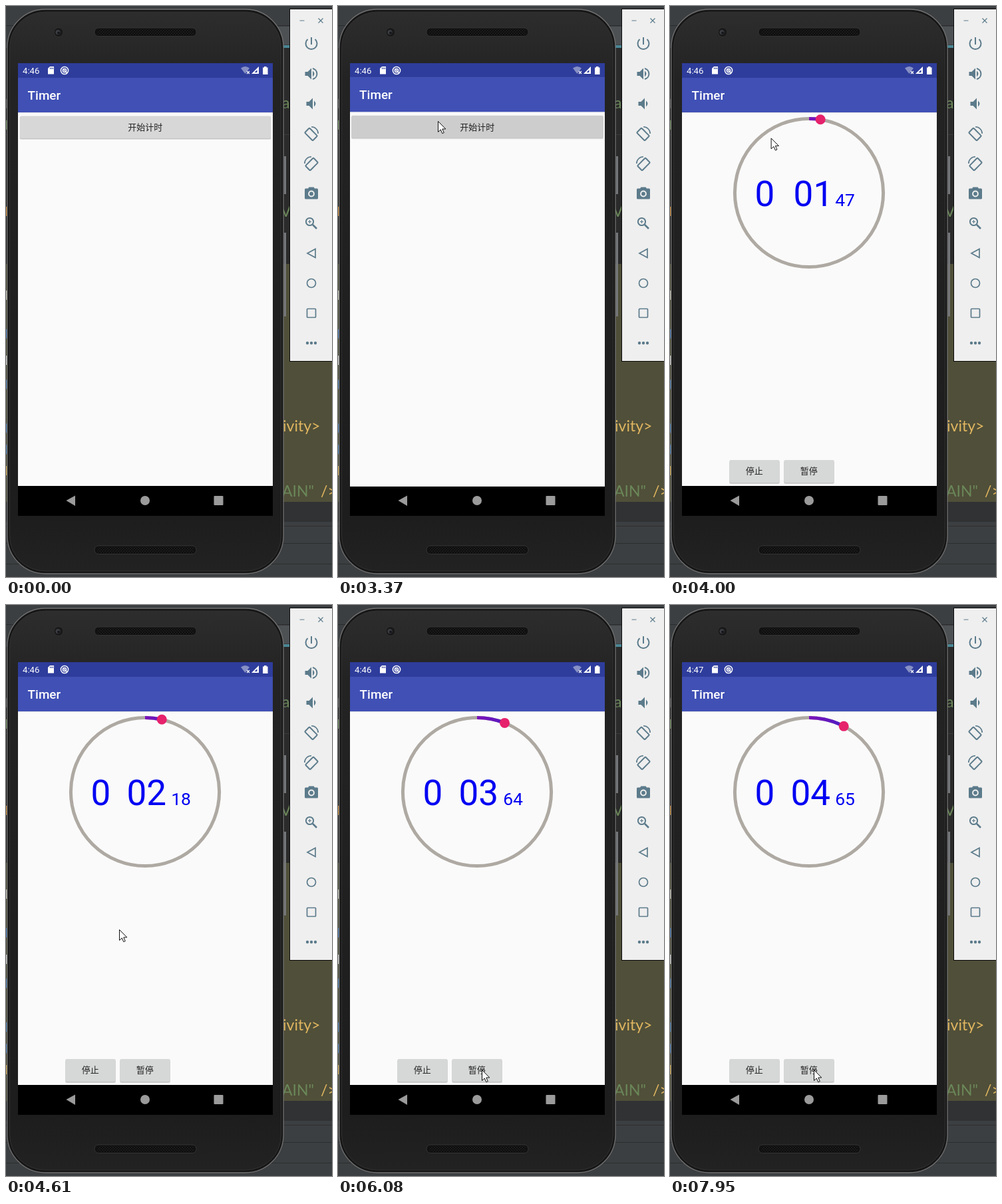
These frames come from a looping animation (490x859 px, 8000 ms). An HTML page:

```html
<!DOCTYPE html>
<html lang="zh">
<head>
<meta charset="utf-8">
<title>Timer</title>
<style>
  html, body { margin: 0; width: 100%; height: 100%; overflow: hidden; background: #2b2b2b; }
  svg { display: block; width: 100vw; height: 100vh; }
  text { font-family: Roboto, sans-serif; white-space: pre; }
  .cjk { font: 13px "Noto Sans CJK SC", "Noto Sans CJK", sans-serif; fill: #222; text-anchor: middle; }
  .code text { font: 23px Lato, sans-serif; }
  .digits { font-size: 53px; fill: #0000f2; }
  .title { font-size: 18.9px; font-weight: 500; fill: #fff; }
  .line { fill: none; stroke: #5c7b8b; stroke-width: 2; }
  .thin { stroke-width: 1.2; }
  .solid { fill: #5c7b8b; }
</style>
</head>
<body>
<svg viewBox="0 0 490 859" preserveAspectRatio="none">
  <defs>
    <linearGradient id="body" x1="0" y1="0" x2="0" y2="1">
      <stop offset="0" stop-color="#2d2d2d"/><stop offset=".12" stop-color="#232323"/>
      <stop offset=".9" stop-color="#1d1d1d"/><stop offset="1" stop-color="#222"/>
    </linearGradient>
    <linearGradient id="sweep" gradientUnits="userSpaceOnUse" x1="209" y1="0" x2="262" y2="0">
      <stop offset="0" stop-color="#7c12b8"/><stop offset="1" stop-color="#4c1cc4"/>
    </linearGradient>
    <pattern id="mesh" width="4" height="4" patternUnits="userSpaceOnUse">
      <rect width="4" height="4" fill="#0c0c0c"/>
      <circle cx="1" cy="1" r=".8" fill="#303030"/><circle cx="3" cy="3" r=".8" fill="#303030"/>
    </pattern>
    <clipPath id="screen"><rect x="18" y="86" width="383" height="681"/></clipPath>
    <g id="speaker">
      <rect x="133" y="33" width="153" height="12.5" rx="6" fill="#111" stroke="#343434"/>
      <rect x="137" y="35" width="145" height="8.5" rx="4" fill="url(#mesh)"/>
    </g>
    <g id="frame">
      <rect x="18" y="86" width="383" height="681"/>
      <rect x="18" y="86" width="383" height="636" fill="#fafafa"/>
      <rect x="18" y="160" width="383" height="1" fill="#dedee4"/>
      <rect x="18" y="108" width="383" height="52" fill="#4050b5"/>
      <rect x="18" y="86" width="383" height="22" fill="#2e3d9c"/>
      <text class="title" x="32.6" y="141">Timer</text>
    </g>
    <g id="key">
      <rect x="-.5" y=".5" width="76" height="35.5" rx="2.5" fill="#e2e2e2"/>
      <rect x="0" y="1" width="75" height="34.6" rx="2" fill="#c4c4c4"/>
      <rect width="75" height="34" rx="2" fill="#d6d7d7"/>
    </g>
  </defs>

  <!-- editor behind the phone -->
  <rect width="490" height="859" fill="#2b2b2b"/>
  <rect width="490" height="63" fill="#3c3f41"/>
  <rect y="29" width="490" height="1" fill="#2a2c2d"/>
  <rect x="405" y="31" width="22" height="27" fill="#4d5154"/>
  <rect x="405" y="59" width="22" height="4" fill="#4a8896"/>
  <rect y="193" width="427" height="1" fill="#3a3a3a"/>
  <rect y="388" width="490" height="358" fill="#504f39"/>
  <rect y="746" width="490" height="30" fill="#303234"/>
  <rect y="776" width="490" height="83" fill="#3c3f41"/>
  <path d="M0 782.5H490M0 808.5H490M0 839.5H490" stroke="#2c2e2f"/>
  <g class="code" fill="#6a8759">
    <text x="415" y="154">a</text>
    <text x="413" y="317">V</text>
    <text x="415" y="738">AIN"</text>
    <g fill="#e0b660">
      <text x="416" y="640">ivity&gt;</text>
      <text x="473" y="738">/&gt;</text>
    </g>
  </g>
  <g id="margin"></g>

  <!-- phone -->
  <path d="M419.5 226V283M419.5 341V467" stroke="#75777a" stroke-width="3"/>
  <rect x="2" y="5" width="415" height="849" rx="57" fill="#161616" stroke="#707070" stroke-width="1.3"/>
  <rect x="5.5" y="9" width="408" height="841" rx="53" fill="url(#body)" stroke="#323232"/>
  <use href="#speaker"/>
  <use href="#speaker" y="779"/>
  <circle cx="79" cy="39.5" r="7" fill="#191919" stroke="#323232"/>
  <circle cx="78" cy="39.5" r="3.5" fill="#3b3d42"/>
  <circle cx="79" cy="40.5" r="2" fill="#15161a"/>

  <g clip-path="url(#screen)">
    <rect x="18" y="86" width="383" height="681"/>
    <g id="home">
      <use href="#frame"/>
      <rect x="20.5" y="166" width="378" height="35" rx="2.5" fill="#dedede"/>
      <rect x="21" y="166" width="377" height="34" rx="2" fill="#c4c4c4"/>
      <rect id="start" x="21" y="165.5" width="377" height="33.5" rx="2"/>
      <text class="cjk" x="209.3" y="187.3">开始计时</text>
    </g>
    <g id="timer">
      <use href="#frame"/>
      <circle cx="209" cy="281" r="111.6" fill="none" stroke="#aea9a2" stroke-width="5"/>
      <path id="arc" fill="none" stroke="url(#sweep)" stroke-width="5"/>
      <circle id="ball" r="7.5" fill="#e6226c"/>
      <g class="digits">
        <text x="127.5" y="301">0</text>
        <text id="sec" y="301"></text>
        <text id="hund" y="301" font-size="26.5"></text>
      </g>
      <use href="#key" x="89.5" y="683"/>
      <use href="#key" x="171.5" y="683"/>
      <rect id="press" x="171.5" y="683" width="75" height="34" rx="2"/>
      <text class="cjk" x="126.7" y="704.3">停止</text>
      <text class="cjk" id="label" x="208.7" y="704.3"></text>
    </g>

    <!-- system bars -->
    <text id="clock" x="25" y="102" font-size="13.2" fill="#fff"></text>
    <path d="M66 91H72V102.5H63V94Z" fill="#fff"/>
    <path d="M66.5 92.5V95M68.5 92.5V95M70.5 92.5V95" stroke="#2e3d9c"/>
    <g fill="none" stroke="#fff" stroke-width="1.5">
      <circle cx="88" cy="97" r="5.6"/>
      <circle cx="88" cy="97" r="2.6"/>
      <path d="M85.5 94.5L92 101"/>
    </g>
    <path d="M353 93.5Q359.5 88.5 366 93.5L359.5 102Z" fill="#8790c5"/>
    <path d="M362 98L366 102M366 98L362 102" stroke="#fff" stroke-width="1.3"/>
    <path d="M380 91V102H369Z" fill="#fff"/>
    <path d="M377.5 96V100H373.5Z" fill="#2e3d9c"/>
    <path d="M386 92.5H388V91H391.5V92.5H393.5V103H386Z" fill="#fff"/>
    <g fill="#9b9b9b">
      <path d="M90.5 744L104 736.5V752Z"/>
      <circle cx="209" cy="744" r="7"/>
      <rect x="312.5" y="737" width="14" height="14" rx="1"/>
    </g>
  </g>

  <!-- emulator toolbar -->
  <rect x="426.5" y="4.5" width="70" height="530" fill="#efefef" stroke="#080808"/>
  <path class="line thin" d="M441.5 22H448.5M469.5 18.5L476.5 25.5M476.5 18.5L469.5 25.5"/>
  <path class="line" transform="translate(459 57)" d="M0 -10V1M-5.5 -7A8.5 8.5 0 1 0 5.5 -7"/>
  <g transform="translate(459 102)">
    <path class="solid" d="M-9.5 -3H-5.5L0 -8.5V8.5L-5.5 3H-9.5ZM2 -4.5Q7 0 2 4.5Z"/>
    <path class="line" d="M2 -8A8.2 8.2 0 0 1 2 8"/>
  </g>
  <path class="solid" transform="translate(459 147)" d="M-7.5 -3H-3.5L2 -8.5V8.5L-3.5 3H-7.5ZM4 -4.5Q9 0 4 4.5Z"/>
  <g id="turn" transform="translate(459 192)">
    <rect class="line" x="-5" y="-8.5" width="10" height="17" rx="1.2" transform="translate(-.5 1) rotate(-45)"/>
    <path class="line" d="M0 -10.2A10.2 10.2 0 0 1 10.2 0" style="stroke-width:1.6"/>
  </g>
  <use href="#turn" transform="translate(918 45) scale(-1 1)"/>
  <g transform="translate(459 282)">
    <path class="solid" d="M-3.5 -9.5H3.5L5 -7.5H8.5Q10 -7.5 10 -6V7Q10 8.5 8.5 8.5H-8.5Q-10 8.5 -10 7V-6Q-10 -7.5 -8.5 -7.5H-5Z"/>
    <circle r="3.9" cy=".5" fill="#5c7b8b" stroke="#efefef" stroke-width="2"/>
  </g>
  <g transform="translate(459 327)">
    <circle class="line" cx="-2.5" cy="-2.5" r="5.6"/>
    <path class="line" d="M2 2L8 8" style="stroke-width:2.6"/>
    <path class="line thin" d="M-5 -2.5H0M-2.5 -5V0"/>
  </g>
  <g class="line" style="stroke-width:1.7">
    <path d="M453 372L465 365.5V378.5Z"/>
    <circle cx="459" cy="417" r="6.5"/>
    <rect x="452.5" y="455.5" width="13" height="13" rx="1"/>
  </g>
  <g class="solid">
    <circle cx="453" cy="507" r="2.2"/><circle cx="459" cy="507" r="2.2"/><circle cx="465" cy="507" r="2.2"/>
  </g>

  <g id="cursor">
    <circle id="click" r="14" fill="none" stroke="#444" stroke-width="1.5"/>
    <path d="M.5 .5V16.5L4.3 13L6.8 18.7L9.3 17.6L6.8 12H11.8Z" fill="#fff" stroke="#111"/>
  </g>
</svg>

<script>
const LOOP = 8000, TICK = 77.4, OFFSET = 185;
const $ = id => document.getElementById(id);
const set = (id, attrs) => { for (const a in attrs) $(id).setAttribute(a, attrs[a]); };
const show = (id, on) => set(id, { visibility: on ? 'visible' : 'hidden' });
const pad = n => String(n).padStart(2, '0');

// Linear interpolation through [tick, value, ...] keys.
function track(keys, k, col = 1) {
  if (k <= keys[0][0]) return keys[0][col];
  for (let i = 1; i < keys.length; i++) {
    const a = keys[i - 1], b = keys[i];
    if (k <= b[0]) return a[col] + (b[col] - a[col]) * (k - a[0]) / (b[0] - a[0]);
  }
  return keys[keys.length - 1][col];
}

const elapsed = [[43, .95], [44, 1.03], [57, 2.18], [58, 2.18], [59, 2.33], [68, 3.01],
  [83, 4.2], [86, 4.42], [97, 4.42], [100, 4.65]];
const pointer = [[0, 367, 807], [2, 300, 560], [4, 205, 300], [6, 155, 185], [7, 150, 173],
  [48, 150, 173], [53, 158, 300], [57, 170, 488], [58, 170, 488], [68, 203, 587],
  [69, 214, 620], [73, 217, 680], [76, 216, 699]];
const homeScale = [[40, 1], [41, 1.003], [43, 1.045], [44, 1.05]];
const timerScale = [[43, .985], [44, .9935], [45, .998], [46, 1]];
const startTone = [[13, 214.5], [21, 205]];
const pressed = [[84, 0], [86, .06], [88, .06], [90, 0], [94, 0], [95, .06], [98, .06], [100, 0]];

// Code fragments peeking out left of the phone.
const scraps = [[140, '#555'], [172, '#6a8759'], [302, '#c98d3c'], [428, '#c5c5bd'], [486, '#4977b5'], [526, '#d5d5d5'],
  [562, '#4b7bb0'], [628, '#4b7bb0'], [660, '#4b7bb0'], [692, '#d5ad55']];
$('margin').innerHTML = scraps.map(([y, c]) => `<rect y="${y}" width="1.5" height="14" fill="${c}"/>`).join('');

const zoom = s => `translate(209.5 426.5) scale(${s}) translate(-209.5 -426.5)`;

function drawTimer(k) {
  const cs = Math.round(track(elapsed, k) * 100);
  const sec = Math.floor(cs / 100), angle = cs / 100 * Math.PI / 30;
  const x = 209 + 111.6 * Math.sin(angle), y = 281 - 111.6 * Math.cos(angle);
  set('arc', { d: `M209 169.4A111.6 111.6 0 0 1 ${x} ${y}` });
  set('ball', { cx: x, cy: y });
  // Digits are centred by their ink, so a final 1 moves them.
  set('sec', { x: sec % 10 === 1 ? 185.6 : 181.5 });
  set('hund', { x: cs % 10 === 1 ? 246.5 : 248.2 });
  $('sec').textContent = pad(sec);
  $('hund').textContent = pad(cs % 100);
  $('label').textContent = k >= 87 && k < 97 ? '继续' : '暂停';
  set('press', { 'fill-opacity': track(pressed, k) });
  set('timer', { transform: zoom(track(timerScale, k)) });
}

function render(t) {
  const k = Math.floor((t - OFFSET) / TICK);
  const tone = track(startTone, k);
  show('timer', k >= 43);
  show('home', k < 46);
  set('home', { transform: zoom(track(homeScale, k)), opacity: k < 43 ? 1 : .5 });
  set('start', { fill: `rgb(${tone},${tone},${tone})` });
  drawTimer(k);
  $('clock').textContent = k < 94 ? '4:46' : '4:47';
  set('cursor', {
    transform: `translate(${track(pointer, k)} ${track(pointer, k, 2)})`,
    display: k < 0 ? 'none' : 'inline'
  });
  show('click', k === 13 || k === 85 || k === 94);
}

const begin = performance.now();
function loop() {
  render((performance.now() - begin) % LOOP);
  requestAnimationFrame(loop);
}
loop();
</script>
</body>
</html>
```
